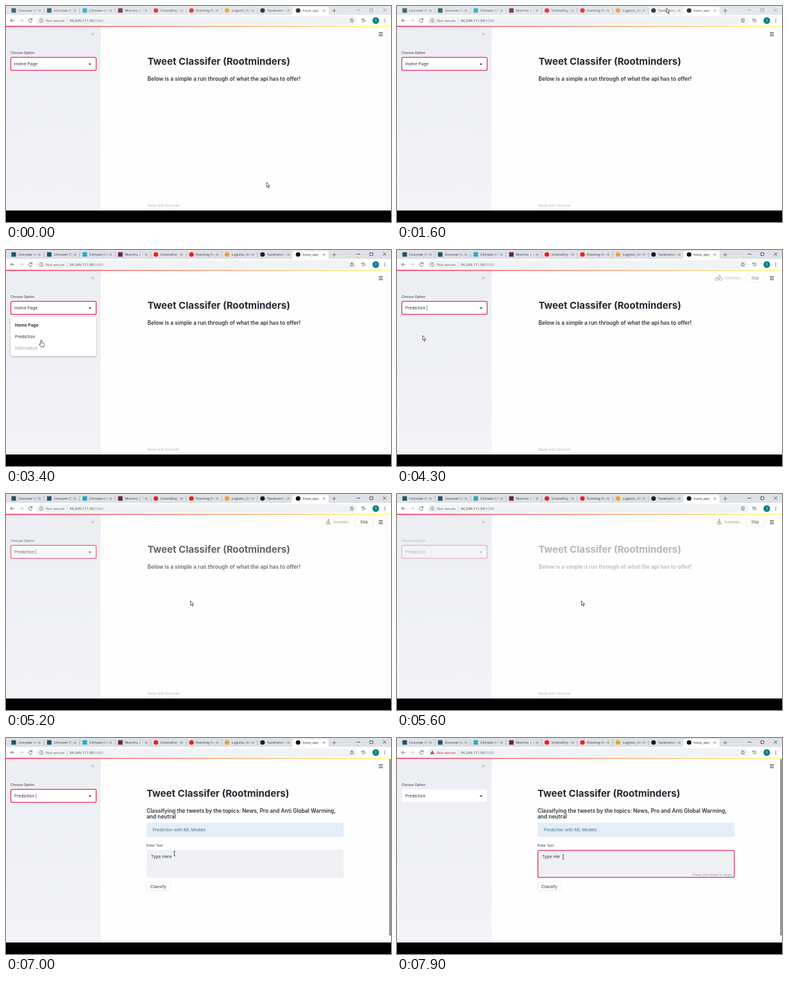
An HTML page for the animation above (8 s loop, 600x338 px).

```html
<!DOCTYPE html>
<html lang="en">
<head>
<meta charset="utf-8">
<title>Tweet classifier walkthrough</title>
<style>
  html, body { margin: 0; width: 100%; height: 100%; overflow: hidden; background: #fefefe; }
  svg { display: block; width: 600px; height: 338px; }
  text { font-family: Inter, "Noto Sans", sans-serif; font-size: 6.6px; fill: #31333f; white-space: pre; }
  .ui text, text.ui { font-family: "Open Sans", "Noto Sans", sans-serif; font-size: 5.8px; fill: #3c4043; }
  .title { font-size: 15px; font-weight: 700; fill: #262730; }
  .sub { font-size: 8.4px; font-weight: 600; }
  .small { font-size: 5.3px; }
  .line { fill: none; stroke-linecap: round; stroke-linejoin: round; }
</style>
</head>
<body>
<svg id="stage" viewBox="0 0 600 338" xmlns="http://www.w3.org/2000/svg"></svg>
<script>
const LOOP = 8000;
const PINK = '#e0315f';

const text = (x, y, s, attrs = '') => `<text x="${x}" y="${y}" ${attrs}>${s}</text>`;
const box = (x, y, w, h, attrs) => `<rect x="${x}" y="${y}" width="${w}" height="${h}" ${attrs}/>`;
const line = (d, color, w = 0.8, attrs = '') =>
  `<path class="line" d="${d}" stroke="${color}" stroke-width="${w}" ${attrs}/>`;
const cross = (x, y, r, color, w) =>
  line(`M${x - r} ${y - r}l${2 * r} ${2 * r}m0 ${-2 * r}l${-2 * r} ${2 * r}`, color, w);
const disc = (x, y, r, color) => `<circle cx="${x}" cy="${y}" r="${r}" fill="${color}"/>`;

const tabs = [
  ['Uncover Data', '#1d5568', 'square'], ['Uncover Data', '#1d5568', 'square'],
  ['Climate Change', '#2aa9c6', 'square'], ['Murmo | 1 unread', '#6b2340', 'square'],
  ['Unending Tide', '#e8201c'], ['Evening Rota', '#e8201c'],
  ['Logistic_Reg', '#f4a024'], ['Tavelumo-re', '#1b1f23'], ['base_app · S', '#111111']
];

function tab([label, color, shape], i) {
  const mark = shape ? box(-3.5, 3.5, 7, 7, `fill="${color}"`) : disc(0, 7, 3.6, color);
  const edge = i < 7 ? line('M47.2 3.5V11', '#9a9fa5', 0.6) : '';
  return `<g transform="translate(${12 + 55.4 * i} 0)">${mark}
    <g mask="url(#fade)">${text(7, 9.3, label)}</g>${cross(40.2, 7.2, 1.6, '#5f6368', 0.7)}${edge}</g>`;
}

const browser = `<g class="ui">
  <rect id="strip" width="600" height="14"/>
  ${box(392, 1.5, 54, 12.5, 'id="hover" rx="2" fill="#f1f3f5"')}
  <path d="M444 14q2.5 0 2.5-2.5V4q0-2.5 2.5-2.5h51q2.5 0 2.5 2.5v7.5q0 2.5 2.5 2.5z" fill="#fff"/>
  <g id="tabs">${tabs.map(tab).join('')}</g>
  ${line('M508.8 7.3h5.4m-2.7-2.7v5.4', '#5f6368')}
  <g id="controls">
    ${line('M547 6.5h4.6', '#222', 0.7)}
    ${line('M567.3 4.3h4.4v4.4h-4.4z', '#222', 0.7)}
    ${cross(590, 6.5, 2.2, '#222', 0.7)}
  </g>
  ${box(0, 14, 600, 17, 'fill="#fff"')}
  ${box(47, 16, 501, 13.4, 'rx="6.7" fill="#f1f3f4"')}
  ${line('M12.6 22.7H7.2m2.5-2.5l-2.5 2.5 2.5 2.5', '#505459')}
  ${line('M21.4 22.7h5.4m-2.5-2.5l2.5 2.5-2.5 2.5', '#b9bcc0')}
  ${line('M40.3 20.9a2.8 2.8 0 1 0 .4 2.6m-.1-4.2v2h-2', '#505459')}
  <g id="safe">${line('M55 19.8a2.9 2.9 0 1 0 .01 0M55 22.5v1.7M55 21.2v.1', '#5f6368', 0.7)}</g>
  <g id="unsafe"><path d="M55 19.3l3.3 6h-6.6z" fill="#c5221f"/>${line('M55 21.4v1.6M55 24.2v.1', '#fff', 0.6)}</g>
  <text id="secure" x="62" y="24.8">Not secure</text>
  ${line('M95.3 19.5v6.4', '#b4b8bc', 0.6)}
  <text x="99" y="24.8">34.249.111.90<tspan fill="#80868b">:5000</tspan></text>
  ${line('M539 19.6l.9 2 2.1.2-1.6 1.5.5 2.1-1.9-1.1-1.9 1.1.5-2.1-1.6-1.5 2.1-.2z', '#505459', 0.7)}
  ${line('M554.6 21.3a2.7 2.7 0 1 1-.1 2.3m-.4-3.3l.4 1.5 1.5-.3M557 21.2v1.7l1.2.7', '#505459', 0.7)}
  ${disc(576.3, 22.7, 5.2, '#0f7f86')}
  ${text(576.3, 24.6, 'T', 'text-anchor="middle" style="fill:#fff;font-size:5.4px"')}
  ${[20.4, 22.7, 25].map(y => disc(590.3, y, 0.7, '#505459')).join('')}
</g>`;

const sidebar = `
  ${box(0, 32, 147.5, 288, 'fill="url(#side)"')}
  ${cross(135, 44, 2.1, '#a9adb5', 0.9)}
  <g id="choice">
    ${text(7, 74.5, 'Choose Option', 'class="small"')}
    <rect id="select" x="7.5" y="80.3" width="133" height="20.4" rx="2" fill="#fff"/>
    <text id="picked" x="13" y="93"></text>
    ${line('M46.8 86.8v7.4', '#31333f', 0.6, 'id="caret"')}
    <path d="M128.8 90h4.2l-2.1 2.4z" fill="#31333f"/>
  </g>`;

const page = `
  <g id="heading">${text(220.5, 91.6, 'Tweet Classifer (Rootminders)', 'class="title"')}</g>
  <g id="home">
    <g id="intro">${text(220.5, 116.6, 'Below is a simple a run through of what the api has to offer!', 'class="sub"')}</g>
    ${text(220.5, 314, 'Made with Streamlit', 'class="small" style="fill:#b3b6bd"')}
  </g>
  <g id="predict">
    ${text(219, 116.6, 'Classifying the tweets by the topics: News, Pro and Anti Global Warming,', 'class="sub"')}
    ${text(219, 125.5, 'and neutral', 'class="sub"')}
    ${box(219, 132.5, 307, 22.5, 'rx="2" fill="#e3eef8"')}
    ${text(228.5, 146, 'Prediction with ML Models', 'style="fill:#3b7684"')}
    ${text(219, 169.8, 'Enter Text', 'class="small"')}
    <rect id="area" x="219.6" y="175.8" width="306" height="42.4" rx="2" fill="#eff1f5"/>
    <text id="entry" x="226" y="188.3"></text>
    ${text(523, 215.6, 'Press Ctrl+Enter to apply', 'id="hint" class="small" text-anchor="end" style="fill:#989ca6"')}
    ${box(219.5, 225.8, 36.5, 12.8, 'rx="2" fill="#fff" stroke="#e3e5ea" stroke-width=".7"')}
    ${text(225, 234.6, 'Classify')}
    ${box(597.2, 33, 2.5, 276, 'fill="#868686"')}
  </g>`;

const icons = [
  // wheelchair
  disc(502.5, 40.3, 1, '#777') + line('M502 42l-.6 3h3l1 2.6M501.8 43h2.4M500.2 43.5a2.3 2.3 0 1 0 3.2 3', '#777'),
  // bicycle
  line('M498 43.4a2.3 2.3 0 1 0 .01 0M504.4 43.4a2.3 2.3 0 1 0 .01 0M498 45.7l2-3 2.2 1.4v2M500 42.7l2-1.4 1.3 1.4h1.6', '#777')
    + disc(503, 39.7, 1, '#777'),
  // runner
  disc(503, 40, 1, '#777') + line('M499.3 43l2-1.3 1.4.6 1 1.3h1.6M502.3 42.3l-.8 2.6 1.6 1.3v2M501.5 45l-1 1.6h-2', '#777')
];

const status = `<g id="status">
  ${icons.map((art, i) => `<g id="icon${i}">${art}</g>`).join('')}
  ${text(510.3, 46, 'RUNNING...', 'class="small" style="fill:#9a9da5;font-size:5.1px"')}
  ${box(544, 38, 28, 12, 'rx="2" fill="#fff" stroke="#e3e5ea" stroke-width=".7"')}
  ${text(552, 46, 'Stop', 'style="font-size:5.5px"')}
</g>`;

const menu = `<g id="menu">
  ${box(7, 104.5, 133.5, 61.5, 'rx="2" fill="#fff" filter="url(#shadow)"')}
  ${text(14, 119.6, 'Home Page', 'style="font-weight:700"')}
  ${text(14, 137.6, 'Prediction')}
  ${text(14, 155.6, 'Information', 'style="fill:#9b9da4"')}
</g>`;

const pointer = `<g id="pointer" fill="#fff" stroke="#222" stroke-width=".7" stroke-linejoin="round">
  <path id="arrow" d="M0 0V7.4L1.7 5.9 2.9 8.8 4 8.3 2.8 5.5H5.1Z"/>
  <path id="hand" d="M-.9.9a.9.9 0 0 1 1.8 0V4l3 .9q1 .4.8 1.6l-.7 4h-4.6L-3.4 6.8q-.3-1.3.8-1.1L-.9 6.9Z"/>
  <path id="beam" fill="none" d="M-1.4-3.4H1.4M0-3.4V3.4M-1.4 3.4H1.4"/>
</g>`;

document.getElementById('stage').innerHTML = `
  <defs>
    <linearGradient id="fadeRamp" gradientUnits="userSpaceOnUse" x1="29" x2="38">
      <stop stop-color="#fff"/><stop offset="1" stop-color="#000"/>
    </linearGradient>
    <mask id="fade" maskUnits="userSpaceOnUse" x="0" y="0" width="38" height="14">
      ${box(0, 0, 38, 14, 'fill="url(#fadeRamp)"')}
    </mask>
    <linearGradient id="side" x2="0" y2="1">
      <stop stop-color="#eceef3"/><stop offset="1" stop-color="#f3f4f8"/>
    </linearGradient>
    <linearGradient id="ribbon"><stop stop-color="#f63366"/><stop offset="1" stop-color="#fffd80"/></linearGradient>
    <filter id="shadow" x="-10%" y="-10%" width="120%" height="125%">
      <feDropShadow dx="0" dy="1" stdDeviation="1.7" flood-opacity=".28"/>
    </filter>
  </defs>
  ${box(0, 0, 600, 338, 'fill="#fefefe"')}
  ${sidebar}${page}${browser}
  ${box(0, 31, 600, 1.6, 'fill="url(#ribbon)"')}
  ${status}
  ${line('M581.4 41.7h5.4m-5.4 2.4h5.4m-5.4 2.4h5.4', '#31333f', 0.9)}
  ${menu}
  ${box(0, 320, 600, 18, 'fill="#000"')}
  ${pointer}`;

const el = {};
document.querySelectorAll('#stage [id]').forEach(node => { el[node.id] = node; });

const clamp = v => Math.min(1, Math.max(0, v));
const ramp = (t, from, to) => clamp((t - from) / (to - from));
const show = (id, on) => el[id].setAttribute('display', on ? 'inline' : 'none');
const fade = (id, v) => el[id].setAttribute('opacity', v);
const write = (id, s) => { if (el[id].textContent !== s) el[id].textContent = s; };
function outline(id, color, width) {
  el[id].setAttribute('stroke', color);
  el[id].setAttribute('stroke-width', width);
}

// time, x, y
const path = [
  [0, 406, 276], [100, 406, 276], [900, 425.5, 1], [1550, 425.5, 1],
  [2150, 160, 109], [2400, 143.5, 99], [2750, 100, 91], [2900, 100, 91],
  [3350, 55, 141], [3450, 55, 141], [3750, 40, 134], [4550, 40, 134],
  [5100, 287.5, 167], [6450, 287.5, 167], [7050, 262, 181], [7250, 262, 181],
  [7450, 259, 186], [8000, 259, 186]
];

function pointerAt(t) {
  const i = Math.max(1, path.findIndex(p => p[0] > t));
  const [a, b] = [path[i - 1], path[i]];
  const k = ramp(t, a[0], b[0]);
  const s = k * k * (3 - 2 * k);
  return [a[1] + (b[1] - a[1]) * s, a[2] + (b[2] - a[2]) * s];
}

function draw(t) {
  const active = t >= 1800;
  const loaded = t >= 6300;
  const focused = t >= 7400;
  const edited = t >= 7700;
  const menuOpen = t >= 2800 && t < 3900;
  const chosen = t >= 3900;

  el.strip.setAttribute('fill', active ? '#dee1e6' : '#e4e7eb');
  fade('tabs', active ? 1 : 0.85);
  fade('controls', active ? 1 : 0.45);
  show('hover', t >= 850 && t < 1650);
  show('safe', !edited);
  show('unsafe', edited);
  el.secure.style.fill = edited ? '#c5221f' : '#5f6368';

  const stale = loaded ? 1 : 1 - 0.67 * Math.pow(ramp(t, 4600, 5600), 1.7);
  fade('choice', stale);
  fade('intro', stale);
  fade('heading', t >= 5700 ? 1 : stale);
  el.heading.setAttribute('transform', `translate(${loaded ? -1.5 : 0} 0)`);

  write('picked', chosen ? 'Prediction' : 'Home Page');
  outline('select', focused ? '#e6e8ee' : PINK, focused ? 0.5 : 1.3);
  show('caret', chosen && !focused && t % 1000 < 500);
  show('menu', menuOpen);
  fade('menu', ramp(t, 2750, 2950));

  show('home', !loaded);
  show('predict', loaded);
  outline('area', focused ? PINK : '#eff1f5', 1.3);
  write('entry', edited ? 'Type Her' : 'Type Here');
  show('hint', edited);

  fade('status', ramp(t, 4100, 4400) * (1 - ramp(t, 6500, 6700)));
  const icon = Math.floor((t + 4800) / 500 + 1) % 3;
  icons.forEach((_, i) => show('icon' + i, i === icon));

  const [x, y] = pointerAt(t);
  const overSelect = x > 7 && x < 141 && y > 80 && y < (menuOpen ? 166 : 101);
  const overArea = loaded && y > 176 && y < 218;
  el.pointer.setAttribute('transform', `translate(${x} ${y})`);
  show('hand', overSelect);
  show('beam', overArea);
  show('arrow', !overSelect && !overArea);
}

function tick(now) {
  draw(now % LOOP);
  requestAnimationFrame(tick);
}
draw(0);
requestAnimationFrame(tick);
</script>
</body>
</html>
```
